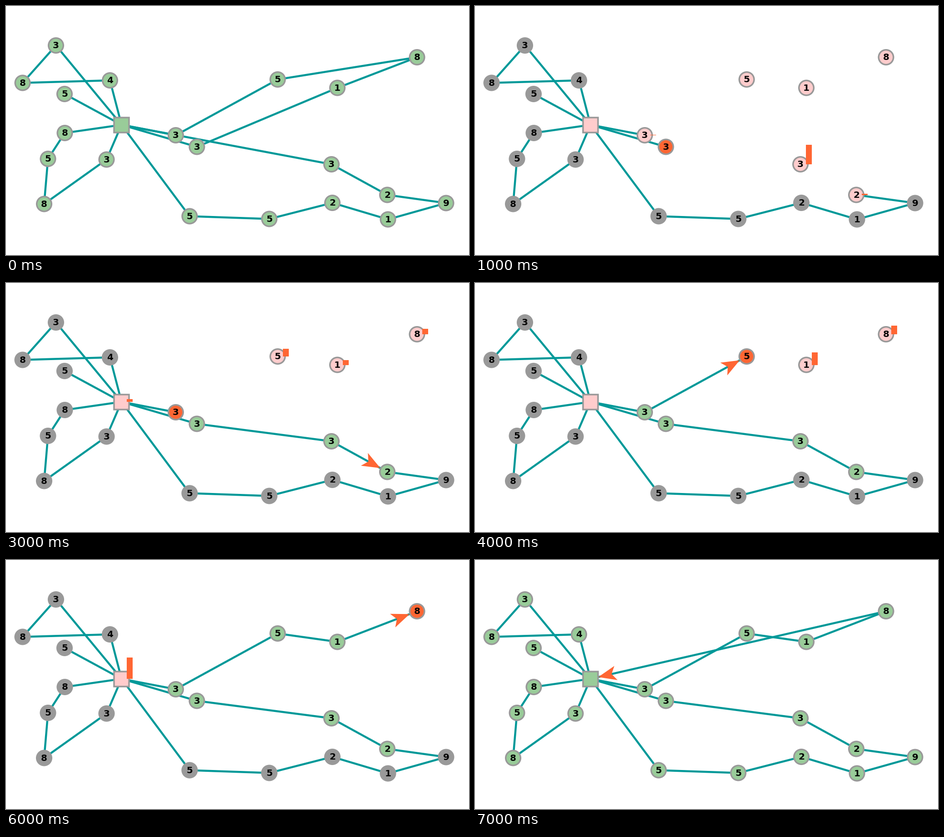
Animation of 1020x549 px, one loop 8000 ms. Source, as a matplotlib script:

```python
import numpy as np
import matplotlib.pyplot as plt
from matplotlib.animation import FuncAnimation
from matplotlib.patches import Circle, Polygon, Rectangle

W, H, DPI = 1020, 549, 64
PT = 72 / DPI  # points per pixel
TEAL, GRAY = "#009999", "#999999"
GREEN, PINK, ORANGE = "#99cc99", "#ffcccc", "#ff6633"
DEPOT = 0

# x, y, demand; the depot comes first
NODES = [
    (254.5, 262, ""), (110, 87, "3"), (36.5, 169.5, "8"), (229, 164, "4"),
    (129, 194, "5"), (129.5, 280, "8"), (92.5, 337, "5"), (84, 436.5, "8"),
    (221.5, 338.5, "3"), (404.5, 463.5, "5"), (580, 469.5, "5"),
    (719, 434, "2"), (841.5, 470.5, "1"), (969.5, 434.5, "9"),
    (840, 416.5, "2"), (717, 349, "3"), (420.5, 310.5, "3"),
    (374, 285, "3"), (598.5, 162, "5"), (730, 180.5, "1"), (905.5, 113, "8"),
]

KEPT = [(0, 1, 2, 3, 0), (0, 4), (0, 5, 6, 7, 8, 0),
        (0, 9, 10, 11, 12, 13, 14), (0, 16), (0, 17)]
REMOVED = [(0, 15, 14), (17, 18, 20, 19, 16)]
OPEN_NODES = {0, 14, 15, 16, 17, 18, 19, 20}

# One repair step each: new link, current node, bar heights, nodes finished
STEPS = [
    (None, 16, {15: 43, 14: 2.6, 17: 0.6}, set()),
    ((16, 15), 15, {14: 47}, {16}),
    ((15, 14), 17, {18: 17.2, 20: 12, 19: 11, 0: 6.2}, {15, 14}),
    ((17, 18), 18, {20: 19, 19: 28}, {17}),
    ((18, 19), 19, {20: 47}, {18}),
    ((19, 20), 20, {0: 47}, {19}),
    ((20, 0), None, {}, {20, 0}),
]

fig = plt.figure(figsize=(W / DPI, H / DPI), dpi=DPI, facecolor="white")
ax = fig.add_axes([0, 0, 1, 1])


def point(i):
    return np.array(NODES[i][:2], float)


def draw_path(path):
    for a, b in zip(path, path[1:]):
        ax.plot(*zip(point(a), point(b)), color=TEAL, lw=4.5 * PT, zorder=1)


def draw_node(i, fill):
    x, y, label = NODES[i]
    style = dict(fc=fill, ec=GRAY, lw=3.5 * PT, zorder=3)
    if i == DEPOT:
        ax.add_patch(Rectangle((x - 16.5, y - 16.5), 33, 33, **style))
    else:
        ax.add_patch(Circle((x, y), 16.3, **style))
        ax.text(x, y + 6.3, label, ha="center", va="baseline", zorder=5,
                family="DejaVu Sans", weight="bold", size=20 * PT)


def draw_arrow(a, b):
    end = point(b)
    back = (point(a) - end) / np.hypot(*(point(a) - end))
    side = np.array([-back[1], back[0]])
    shape = [(17.5, 0), (57.5, 16), (47.5, 0), (57.5, -16)]
    ax.add_patch(Polygon([end + u * back + v * side for u, v in shape],
                         fc=ORANGE, lw=0, zorder=2))


def draw_bar(i, height):
    x, y = point(i)
    ax.add_patch(Rectangle((x + 11.7, y - height), 13.2, height,
                           fc=ORANGE, lw=0, zorder=4))


def draw(frame):
    ax.clear()
    ax.set(xlim=(0, W), ylim=(H, 0))
    ax.axis("off")
    for path in KEPT:
        draw_path(path)

    steps = STEPS[:frame]
    complete = frame in (0, len(STEPS))
    if frame == 0:
        for path in REMOVED:
            draw_path(path)

    done, current = set(), None
    for link, current, bars, finished in steps:
        done |= finished
        if link:
            draw_path(link)
    if steps:
        if link:
            draw_arrow(*link)
        for i, height in bars.items():
            draw_bar(i, height)

    for i in range(len(NODES)):
        if complete or i in done:
            fill = GREEN
        elif i == current:
            fill = ORANGE
        else:
            fill = PINK if i in OPEN_NODES else GRAY
        draw_node(i, fill)
    return []


anim = FuncAnimation(fig, draw, frames=len(STEPS) + 1, init_func=lambda: [],
                     interval=1000, repeat=True, repeat_delay=0)
plt.show()
```
